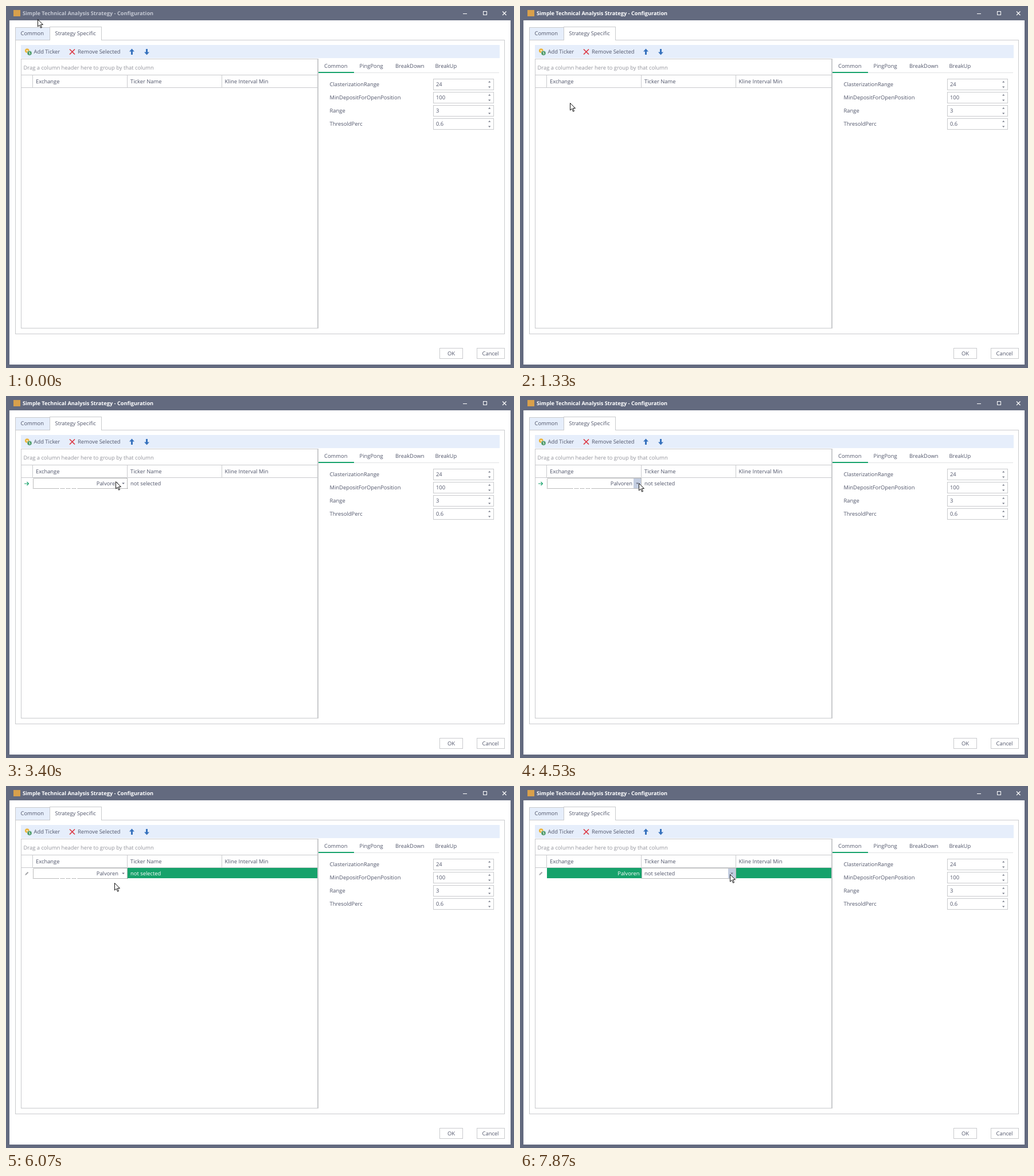
Animation of 886 by 632 pixels, one loop 8 s. Source, as an HTML page:

```html
<!DOCTYPE html>
<html lang="en">
<head>
<meta charset="utf-8">
<title>Strategy configuration</title>
<style>
html, body { margin: 0; width: 100%; height: 100%; overflow: hidden; background: #636a7f; }
svg { display: block; }
text { font: 9.4px "Open Sans", "Noto Sans", sans-serif; fill: #50556a; text-rendering: geometricPrecision; white-space: pre; }
rect, .line { shape-rendering: crispEdges; }
.line { fill: none; stroke: #c9cacd; }
.box { fill: #fff; stroke: #c9cacd; }
.tint { fill: #e6eefb; }
.green { fill: #16a26b; }
.end { text-anchor: end; }
.mid { text-anchor: middle; }
.white { fill: #fff; }
#title { font-weight: 700; font-size: 9.2px; }
</style>
</head>
<body>
<svg width="886" height="632" viewBox="0 0 886 632">
  <rect width="886" height="632" fill="#636a7f"/>
  <rect x="13" y="7" width="12" height="11" fill="#d8a04c"/>
  <text id="title" x="29" y="15.7">Simple Technical Analysis Strategy - Configuration</text>
  <g fill="none" stroke="#fff">
    <path class="line" style="stroke:#fff" d="M797 13.5h7M832.5 9.5h6v6h-6z"/>
    <path d="M866 9.5l6.5 6.5m0-6.5L866 16" stroke-width="1.2"/>
  </g>
  <rect x="6" y="25" width="874" height="601" fill="#fff"/>

  <rect class="box" x="16.5" y="59.5" width="853" height="513"/>
  <rect id="tab" x="16.5" y="37.5" width="60" height="22" stroke="#c9cacd"/>
  <path class="line" style="fill:#fff" d="M76.5 60V36.5h90V60"/>
  <path class="line" style="stroke:#fff" d="M77 59.5h89"/>
  <text x="25.5" y="51.3">Common</text>
  <text x="85.5" y="51.3">Strategy Specific</text>

  <rect class="tint" x="26" y="68" width="835" height="23"/>
  <rect id="addHot" x="26" y="68" width="76" height="23" fill="#c3cde0"/>
  <rect id="removeHot" x="103" y="68" width="103" height="23" fill="#c3cde0"/>
  <circle cx="36.8" cy="78" r="3.8" fill="#ecb43a"/>
  <circle cx="36.8" cy="78" r="1.3" fill="#fff2c8"/>
  <circle cx="41" cy="82.3" r="4" fill="#3c9159" stroke="#e6eefb" stroke-width=".6"/>
  <path d="M42.3 80.7h-2v1.6h1.8v1.6h-2" fill="none" stroke="#fff" stroke-width=".8"/>
  <path d="M111 75.5l9 9m0-9l-9 9" stroke="#dc3440" stroke-width="1.7"/>
  <path id="up" d="M219.5 74.5l4.5 5h-3v5.5h-3v-5.5h-3z" fill="#3772bd"/>
  <path d="M245.5 85.5l4.5-5h-3V75h-3v5.5h-3z" fill="#3772bd"/>
  <text x="48.5" y="83.3">Add Ticker</text>
  <text x="125" y="83.3">Remove Selected</text>

  <rect class="box" x="26.5" y="92.5" width="517" height="470"/>
  <path class="line" d="M26 120.5h518M26 142.5h518M46.5 121v22M211.5 121v22M376.5 121v22M544.5 92v471"/>
  <text x="30.5" y="110.5" style="fill:#93949c">Drag a column header here to group by that column</text>
  <text x="52" y="135.3">Exchange</text>
  <text x="217" y="135.3">Ticker Name</text>
  <text x="381.5" y="135.3">Kline Interval Min</text>

  <path class="line" style="stroke:#e1e2e5" d="M545 116.5h315"/>
  <rect class="green" x="545" y="115" width="62" height="2"/>
  <text x="555" y="108.3">Common</text>
  <text x="616.5" y="108.3">PingPong</text>
  <text x="679" y="108.3">BreakDown</text>
  <text x="748.5" y="108.3">BreakUp</text>
  <g id="fields"></g>

  <rect class="box" x="756.5" y="597.5" width="40" height="18"/>
  <rect class="box" x="821.5" y="597.5" width="48" height="18"/>
  <text class="mid" x="776.5" y="610">OK</text>
  <text class="mid" x="845" y="610">Cancel</text>

  <g id="row">
    <path id="arrow" d="M32 153h7.5m-3-3l3 3-3 3" fill="none" stroke="#16a26b" stroke-width="1.1"/>
    <path id="pencil" d="M33.2 155.8l.6-2 4-4 1.5 1.5-4 4z" fill="#a6a7ab"/>
    <rect id="band" class="green" x="47" y="143" width="496" height="18"/>
    <g id="cell">
      <rect x="47" y="143" width="165" height="19" fill="#fff"/>
      <rect id="drop" x="198" y="144" width="13" height="17"/>
      <rect x="47.5" y="143.5" width="164" height="18" fill="none" stroke="#777" stroke-dasharray="1 1"/>
      <path d="M202.2 151.5h4.8l-2.4 2.5z" fill="#6c7080"/>
    </g>
    <text id="exchange" class="end" y="156">Palvoren</text>
    <text id="ticker" x="217" y="156">not selected</text>
  </g>

  <g id="popup">
    <rect x="50" y="164" width="164" height="77" fill="#000" opacity=".16"/>
    <rect x="49" y="163" width="164" height="76" fill="#000" opacity=".4"/>
    <rect x="47.5" y="161.5" width="164" height="76" fill="#fff" stroke="#b4b5b9"/>
    <rect class="green" x="48" y="162" width="163" height="19"/>
    <text class="white" x="52" y="174.6">Palvoren</text>
    <text x="52" y="193.6">Quorsel</text>
    <text x="52" y="212.6">Kestavo</text>
    <text x="52" y="231.6">Darvul</text>
  </g>

  <path id="cursor" d="M.5 .5V13l3-2.7 2.1 4.9 1.9-.8-2.1-4.8h4.1z" fill="#fff" stroke="#111"/>
</svg>
<script>
const $ = id => document.getElementById(id);
const show = (id, on) => $(id).style.display = on ? "" : "none";
const TICK = 1000 / 15, LOOP = 8000;
const OPEN = 77, CLOSE = 91, REFOCUS = 109;

$("fields").innerHTML = [["ClasterizationRange", 24], ["MinDepositForOpenPosition", 100], ["Range", 3], ["ThresoldPerc", 0.6]]
  .map(([label, value], i) => `<g transform="translate(0 ${i * 23})">
    <text x="564.5" y="140.3">${label}</text>
    <rect class="box" x="745.5" y="127.5" width="105" height="19"/>
    <text x="750" y="140.3">${value}</text>
    <path d="M841 133.5h4.4l-2.2-2.5zm0 7h4.4l-2.2 2.5z" fill="#777b88"/></g>`).join("");

// pointer keys: tick, x, y
const path = [
  [0, 55, 23], [3, 55, 23], [4, 58, 42], [5, 64, 201], [9, 64, 201], [10, 72, 204], [11, 83, 161],
  [14, 83, 161], [17, 87, 169], [23, 87, 169], [25, 106, 125], [26, 112, 88], [27, 90, 84], [29, 40, 84],
  [30, 40, 84], [31, 52, 82], [33, 76, 77], [34, 76, 77], [35, 84, 76], [36, 84, 76], [37, 83, 83],
  [42, 83, 83], [43, 98, 84], [44, 125, 88], [47, 176, 144], [50, 176, 144], [51, 191, 149], [53, 205, 151],
  [55, 205, 151], [56, 207, 152], [81, 207, 153], [85, 189, 169], [93, 189, 169], [96, 330, 162],
  [99, 330, 162], [104, 356, 162], [111, 367, 153], [116, 367, 153], [117, 366, 154], [120, 366, 154]
];

function pointer(n) {
  const i = path.findIndex(k => k[0] > n);
  const [t0, x0, y0] = path[i - 1], [t1, x1, y1] = path[i];
  const p = (n - t0) / (t1 - t0);
  return [Math.round(x0 + (x1 - x0) * p), Math.round(y0 + (y1 - y0) * p)];
}

function draw(now) {
  const n = Math.floor((now % LOOP + 5) / TICK) % 120;
  const [x, y] = pointer(n);
  const over = (l, t, r, b) => x >= l && x < r && y >= t && y < b;
  const editing = n >= OPEN, moved = n >= REFOCUS, opened = n >= OPEN && n < CLOSE;
  const shift = moved ? 165 : 0;

  $("cursor").setAttribute("transform", `translate(${x} ${y})`);
  $("title").style.fill = n < 20 ? "#c3c7d2" : "#fff";
  $("tab").style.fill = over(17, 37, 76, 59) ? "#d3dff3" : "#e6eefb";
  show("addHot", over(26, 68, 102, 91));
  show("removeHot", over(103, 68, 206, 91));

  show("row", n >= 37);
  show("band", editing);
  const pencil = editing && !moved || n >= 118;
  show("pencil", pencil);
  show("arrow", !pencil);
  $("cell").setAttribute("transform", `translate(${shift} 0)`);
  $("drop").style.fill = opened ? "#e6eefb" : over(198 + shift, 144, 212 + shift, 161) ? "#c3cde0" : "#fff";
  $("exchange").setAttribute("x", moved ? 208.5 : 196);
  $("exchange").style.fill = moved ? "#fff" : "";
  $("ticker").style.fill = editing && !moved ? "#fff" : "";
  show("popup", opened);
}

const start = performance.now();
function frame() {
  draw(performance.now() - start);
  requestAnimationFrame(frame);
}
frame();
</script>
</body>
</html>
```
